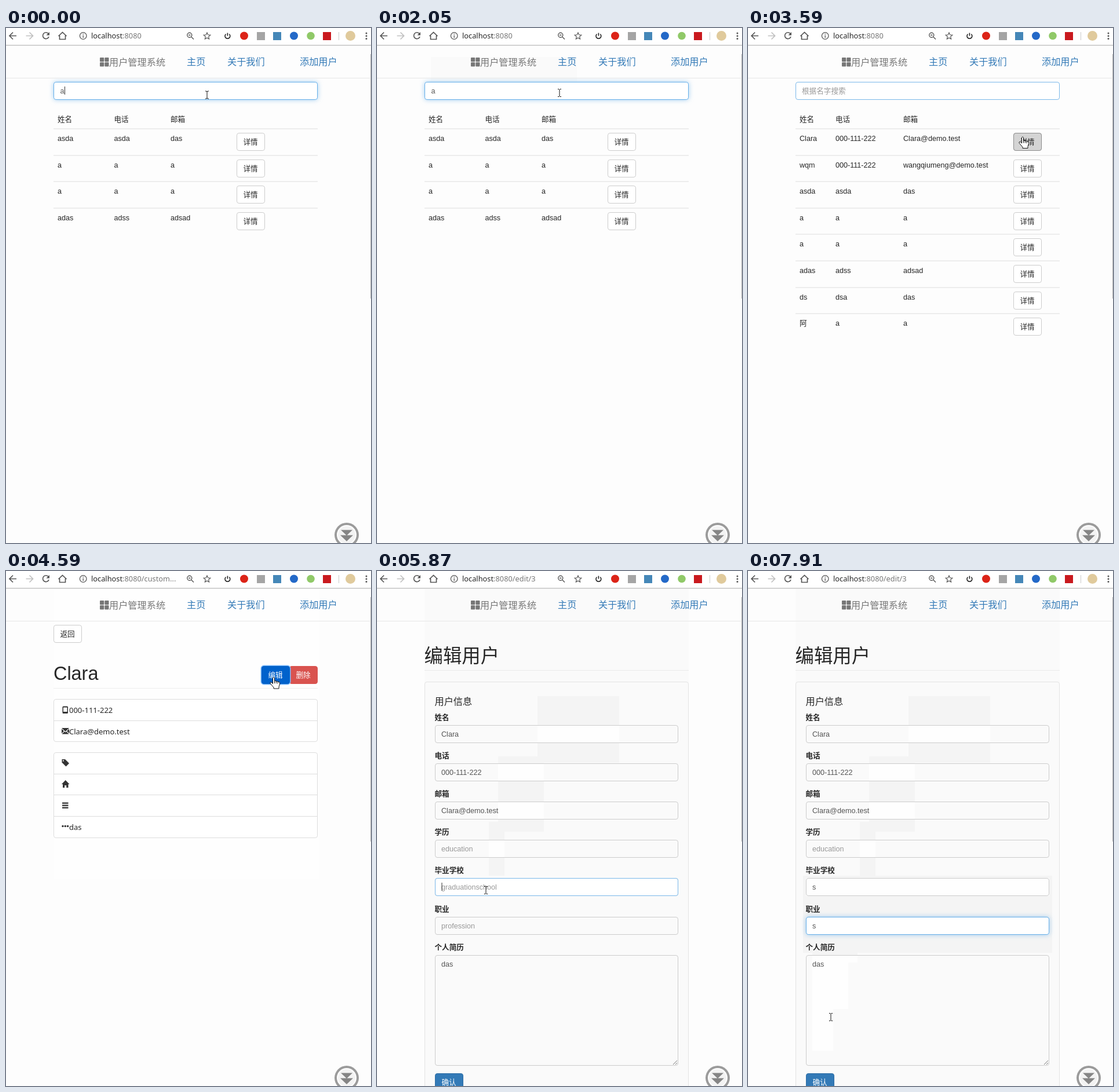
An HTML page for the animation above (8000 ms loop, 630 by 889 pixels).

```html
<!DOCTYPE html>
<html lang="zh">
<head>
<meta charset="utf-8">
<title>用户管理系统</title>
<style>
html, body { margin: 0; width: 100%; height: 100%; overflow: hidden; background: #fdfdfd; }
svg { display: block; width: 630px; height: 889px; }
text { font: 12.6px "Liberation Sans", "Noto Sans CJK SC", "Noto Sans CJK", sans-serif; fill: #262626; white-space: pre; }
.bar { font: 12.8px "Noto Sans", sans-serif; }
.ui { font: 13px "Noto Sans", sans-serif; }
.nav { font-size: 16.2px; fill: #337ab7; }
.h1 { font-size: 32.4px; }
.bold { font-weight: bold; }
.value { fill: #555; }
.hint { fill: #999; }
.glow { filter: drop-shadow(0 0 4px rgba(102, 175, 233, .6)); }
.line { fill: none; stroke: #555; stroke-width: 1.7; }
</style>
</head>
<body>
<svg id="stage" viewBox="0 0 630 889"></svg>
<script>
const LOOP = 8000;
const user = { name: 'Clara', phone: '000-111-222', mail: 'Clara@demo.test' };

// data-on holds pairs of start and end times
const on = (spans, body) => `<g data-on="${spans}">${body}</g>`;
const text = (x, y, s, cls = '', style = '') => `<text x="${x}" y="${y}" class="${cls}" style="${style}">${s}</text>`;
const rect = (x, y, w, h, fill, more = '') => `<rect x="${x}" y="${y}" width="${w}" height="${h}" fill="${fill}" ${more}/>`;
const disc = (x, y, r, fill) => `<circle cx="${x}" cy="${y}" r="${r}" fill="${fill}"/>`;
const path = (d, more = 'class="line"') => `<path d="${d}" ${more}/>`;
const box = (x, y, w, h, fill = '#fff', stroke = '#ccc', more = '') =>
  rect(x + .5, y + .5, w, h, fill, `rx="3.6" stroke="${stroke}" ${more}`);
const rule = (x, y, w, color = '#ddd') => rect(x, y, w, 1, color);
const button = (x, y, label, fill = '#fff', stroke = '#ccc', color = '#262626') =>
  box(x, y, 48, 30, fill, stroke) + text(x + 11.5, y + 19.5, label, '', `fill:${color}`);
const focusBox = (x, y, w, full) => box(x, y, w, 30, '#fff', full ? '#66afe9' : '#7ab8ea', full ? 'class="glow"' : '');
const caret = (x, y) => rect(x, y, 1, 14, '#333');

function chrome() {
  const arrow = 'M18 13.5H6.5M12 7.5L6 13.5L12 19.5';
  return rect(0, 0, 630, 29, '#fff') + rect(0, 29, 630, 1.5, '#c4c4c4')
    + path(arrow) + path(arrow, 'class="line" style="stroke:#c0c0c0" transform="translate(52.5 0) scale(-1 1)"')
    + path('M73.3 10A5.4 5.4 0 1 0 74 15') + path('M75 7V12.5H69.5Z', 'fill="#555"')
    + path('M90.5 14L97.5 7.5L104.5 14M92.5 13V19.5H102.5V13')
    + path('M139 13.5A5.8 5.8 0 1 1 127.4 13.5A5.8 5.8 0 1 1 139 13.5M133.2 12.5V17M133.2 9.8V11.3', 'fill="none" stroke="#555" stroke-width="1.3"')
    + path('M320.8 12.3A4 4 0 1 1 312.8 12.3A4 4 0 1 1 320.8 12.3M320 15.5L324 19.5M315 12.3H318.6', 'fill="none" stroke="#555" stroke-width="1.4"')
    + path('M347 8L348.7 11.8L352.8 12.2L349.7 14.9L350.6 19L347 16.9L343.4 19L344.3 14.9L341.2 12.2L345.3 11.8Z', 'fill="none" stroke="#555" stroke-width="1.2"')
    + path('M379.5 10.5A4.4 4.4 0 1 0 385.3 10.5M382.4 8.5V13.5', 'fill="none" stroke="#222" stroke-width="1.6"')
    + disc(411, 13.5, 7, '#dc2418') + rect(433, 7, 14, 14, '#a5a5a5') + rect(461, 7, 14, 14, '#4587b8')
    + disc(497, 13.5, 7, '#2469c8') + disc(526, 13.5, 6.8, '#90c968') + rect(547, 7, 14, 14, '#c9191e')
    + rect(574, 7, 1, 14, '#ccc') + disc(594.5, 13.5, 8.5, '#e0ca9c')
    + [9, 13.8, 18.6].map(y => disc(622, y, 1.5, '#555')).join('');
}

function address() {
  const url = (spans, rest) => on(spans, text(147, 18, `localhost<tspan fill="#777">${rest}</tspan>`, 'bar'));
  return url('0 3730', ':8080') + url('3730 4740', ':8080/custom...') + url('4740 8000', ':8080/edit/3');
}

function nav() {
  const tiles = [[162, 51], [170.3, 51], [162, 59.3], [170.3, 59.3]];
  return rule(0, 86, 628, '#e7e7e7') + rect(629, 45, 1, 422, '#b5b5b5')
    + tiles.map(([x, y]) => rect(x, y, 7.2, 7.2, '#777', 'rx="1"')).join('')
    + text(178, 65, '用户管理系统', 'nav', 'fill:#777')
    + text(312, 64, '主页', 'nav') + text(382, 64, '关于我们', 'nav') + text(507, 64, '添加用户', 'nav');
}

function table(columns, buttonX, rows) {
  const line = (cells, y) => cells.map((s, i) => text(columns[i], y, s)).join('');
  return line(['姓名', '电话', '邮箱'], 162) + rows.map((cells, i) => {
    const y = 174 + 45.6 * i;
    return rule(82, Math.round(y) - .5, 456) + line(cells, y + 21) + button(buttonX, Math.round(y + 7), '详情');
  }).join('');
}

function lists() {
  const matches = [['asda', 'asda', 'das'], ['a', 'a', 'a'], ['a', 'a', 'a'], ['adas', 'adss', 'adsad']];
  const all = [
    [user.name, user.phone, user.mail], ['wqm', user.phone, 'wangqiumeng@demo.test'],
    ...matches, ['ds', 'dsa', 'das'], ['阿', 'a', 'a'],
  ];
  return on('0 3440', focusBox(82, 93, 455, true)) + on('3440 3730', focusBox(82, 93, 455, false))
    + on('0 2190', text(93.5, 112.5, 'a', 'value') + table([89, 186.5, 284], 398, matches))
    + on('0 280 850 1340 1500 2050', caret(101, 101))
    + on('2190 3730', text(93, 112.5, '根据名字搜索', 'hint') + table([89, 151, 268], 458, all))
    + on('2190 2740 3300 3440', caret(93, 101))
    + on('3300 3440', button(458, 181, '详情', '#e6e6e6', '#adadad'))
    + on('3440 3730', button(458, 181, '详情', '#d4d4d4', '#8c8c8c'));
}

function detail() {
  const icons = path('M99 233.5H105.5Q107 233.5 107 235V244.5Q107 246 105.5 246H99Q97.5 246 97.5 244.5V235Q97.5 233.5 99 233.5ZM99 235.5V243H105.5V235.5Z', 'fill="#333" fill-rule="evenodd"')
    + path('M96 271H109L102.5 277ZM96 272.5L100 276.3L96 280.5ZM109 272.5L105 276.3L109 280.5ZM96.5 281.5L101 277L102.5 278.5L104 277L108.5 281.5Z', 'fill="#333"')
    + path('M96.5 325H102L109 332L103.5 337.5L96.5 330.5Z', 'fill="#333"') + disc(99, 327.6, 1.1, '#fff')
    + path('M102.7 361L109.5 368H107.5V374H104.2V370H101.2V374H98V368H96Z', 'fill="#333"')
    + [399.5, 403.5, 407.5].map(y => rect(97, y, 10.5, 2.3, '#333')).join('')
    + [98, 102.3, 106.6].map(x => disc(x, 440.5, 1.7, '#333')).join('');
  return rect(82, 31, 458, 500, '#fefefe')
    + button(82, 93, '返回') + text(82, 188, user.name, 'h1') + rule(82, 202, 456, '#eee')
    + button(489, 164, '删除', '#d9534f', '#d9534f', '#fff')
    + on('3730 4470', button(441, 164, '编辑', '#286090', '#204d74', '#fff'))
    + on('4470 4740', box(441, 164, 48, 30, 'none', '#80bdff', 'stroke-width="4"')
      + button(441, 164, '编辑', '#0062cc', '#005cbf', '#fff'))
    + box(82, 221, 455, 73, '#fff', '#ddd') + rule(82, 258, 456)
    + box(82, 313, 455, 147, '#fff', '#ddd') + [350, 386, 423].map(y => rule(82, y, 456)).join('')
    + icons + text(109, 245, user.phone, 'ui') + text(109, 282, user.mail, 'ui') + text(109, 447, 'das', 'ui');
}

function edit() {
  const fields = [
    ['姓名', user.name], ['电话', user.phone], ['邮箱', user.mail],
    ['学历', 'education', 'hint'], ['毕业学校', 'graduationschool', 'hint', '4740 6560'],
    ['职业', 'profession', 'hint', '4740 7240'],
  ];
  const top = i => Math.round(265.6 + 66.2 * i);
  const always = '4740 8000';
  // faint repaint areas: start time, x, y, width, height
  const repaints = [
    [5040, 277, 216, 141, 115], [5160, 209, 320, 79, 130], [5310, 193, 433, 27, 93],
    [6560, 111, 568, 78, 108], [7240, 95, 526, 430, 133],
    [7640, 111, 676, 62, 80], [7910, 111, 756, 36, 72],
  ];
  const tint = color => repaints.map(([t, ...r]) => on(`${t} 8000`, rect(...r, color))).join('');
  const inputs = fields.map((_, i) => rect(100, top(i), 420, 31, '#fff')).join('') + rect(100, 663, 420, 191, '#fff');
  return `<clipPath id="inputs">${inputs}</clipPath>`
    + rect(82, 31, 456, 858, '#fafafa')
    + text(81.5, 158, '编辑用户', 'h1') + rule(82, 171, 456, '#e9e9e9')
    + box(82, 191, 455, 720, '#fafafa', '#e3e3e3')
    + tint('#f4f4f4') + `<g clip-path="url(#inputs)">${rect(100, 260, 420, 600, '#fafafa')}${tint('#fefefe')}</g>`
    + text(99.5, 231, '用户信息', '', 'font-size:16.2px')
    + fields.map(([label], i) => text(99.5, top(i) - 9, label, 'bold') + box(100, top(i), 419, 30, 'none')).join('')
    + on('5870 6000 7100 7240', focusBox(100, top(4), 419, false))
    + on('6000 7100', focusBox(100, top(4), 419, true))
    + on('7100 7240', focusBox(100, top(5), 419, false))
    + on('7240 8000', focusBox(100, top(5), 419, true))
    + fields.map(([, value, cls = 'value', spans = always], i) => on(spans, text(111, top(i) + 19.5, value, cls))).join('')
    + on('6560 8000', text(111, top(4) + 19.5, 's', 'value')) + on('7240 8000', text(111, top(5) + 19.5, 's', 'value'))
    + on('5870 6420', caret(111.5, top(4) + 8)) + on('6560 7100', caret(118, top(4) + 8))
    + on('7100 7240', caret(111.5, top(5) + 8)) + on('7240 7790', caret(118, top(5) + 8))
    + text(99.5, 654, '个人简历', 'bold') + box(100, 663, 419, 190, 'none') + text(111, 682.5, 'das', 'value')
    + path('M511 852L518 845M515 852L518 849', 'stroke="#777"')
    + button(100, 867, '确认', '#337ab7', '#2e6da4', '#fff');
}

const toBottom = disc(588, 875, 21, '#9b9b9b') + disc(588, 875, 17, '#fff') + disc(588, 875, 15, '#f3f3f3')
  + path('M578 866.5H598L588 876ZM577 875.5H599L588 886Z', 'fill="#858585"');

const shapes = {
  beam: path('M-3-6.5H-1L0-5.5L1-6.5H3M0-5.5V5.5M-3 6.5H-1L0 5.5L1 6.5H3', 'fill="none" stroke="#111"'),
  arrow: path('M0 0V14.5L3.4 11.5L5.8 16.8L8 15.8L5.6 10.7H10.2Z', 'fill="#fff" stroke="#111"'),
  hand: path('M-1.5 1.5Q0-1 1.5 1.5V6.5L4 7L9 8.5Q11 9 10.5 12L9 17V20H0V18L-6 11Q-6.5 8.5-4 9L-1.5 11.5ZM1.5 6.5V11M4.3 7.5V11M7 8.5V11.5', 'fill="#fff" stroke="#111"'),
};

// time, x, y, shape
const moves = [
  [0, 347, 115.5, 'beam'], [550, 351, 120, 'beam'], [710, 352, 108, 'beam'], [870, 346, 84, 'arrow'],
  [1030, 338, 62, 'arrow'], [1180, 334, 51, 'arrow'], [1340, 326, 76, 'arrow'], [1500, 319, 99, 'beam'],
  [1650, 317, 108, 'beam'], [1770, 315, 112, 'beam'], [2330, 330, 114, 'beam'], [2460, 362, 128, 'arrow'],
  [2600, 402, 148, 'arrow'], [2740, 430, 164, 'arrow'], [3020, 446, 173, 'arrow'], [3160, 462, 182, 'hand'],
  [3300, 474, 187.5, 'hand'], [3870, 468, 185, 'hand'], [4010, 462, 183, 'hand'], [4740, 462, 183, 'arrow'],
  [4890, 408, 216, 'arrow'], [5040, 278, 315, 'arrow'], [5160, 213, 440, 'arrow'], [5310, 197, 510, 'arrow'],
  [5440, 191, 533, 'beam'], [5590, 189, 545, 'beam'], [5740, 188, 551, 'beam'], [6130, 184, 573, 'arrow'],
  [6280, 174, 610, 'beam'], [6420, 165, 636, 'arrow'], [6560, 162, 648, 'arrow'], [6710, 161, 659, 'arrow'],
  [6970, 164, 676, 'beam'], [7240, 168, 690, 'beam'], [7370, 167, 708, 'beam'], [7520, 160, 732, 'beam'],
  [7640, 150, 749, 'beam'], [7790, 143, 821, 'beam'], [7910, 143, 770, 'beam'],
];

const stage = document.getElementById('stage');
stage.innerHTML = rect(0, 0, 630, 889, '#fdfdfd')
  + on('2050 2190', rect(93, 50, 252, 43, '#fafafa'))
  + on('0 3730', lists()) + on('3730 4740', detail()) + on('4740 8000', edit())
  + nav() + chrome() + address() + toBottom
  + '<g id="pointer">' + Object.entries(shapes).map(([name, d]) => `<g data-shape="${name}">${d}</g>`).join('') + '</g>';

const show = (el, visible) => { el.style.display = visible ? '' : 'none'; };
const timed = [...stage.querySelectorAll('[data-on]')].map(el => ({ el, spans: el.dataset.on.split(' ').map(Number) }));
const pointer = document.getElementById('pointer');

function draw(t) {
  // an odd number of passed limits means the part is showing
  timed.forEach(({ el, spans }) => show(el, spans.filter(limit => limit <= t).length % 2));
  const [, x, y, shape] = moves.filter(move => move[0] <= t).pop();
  pointer.setAttribute('transform', `translate(${x} ${y})`);
  for (const el of pointer.children) show(el, el.dataset.shape === shape);
}

const start = performance.now();
function tick() {
  draw((performance.now() - start) % LOOP);
  requestAnimationFrame(tick);
}
tick();
</script>
</body>
</html>
```
